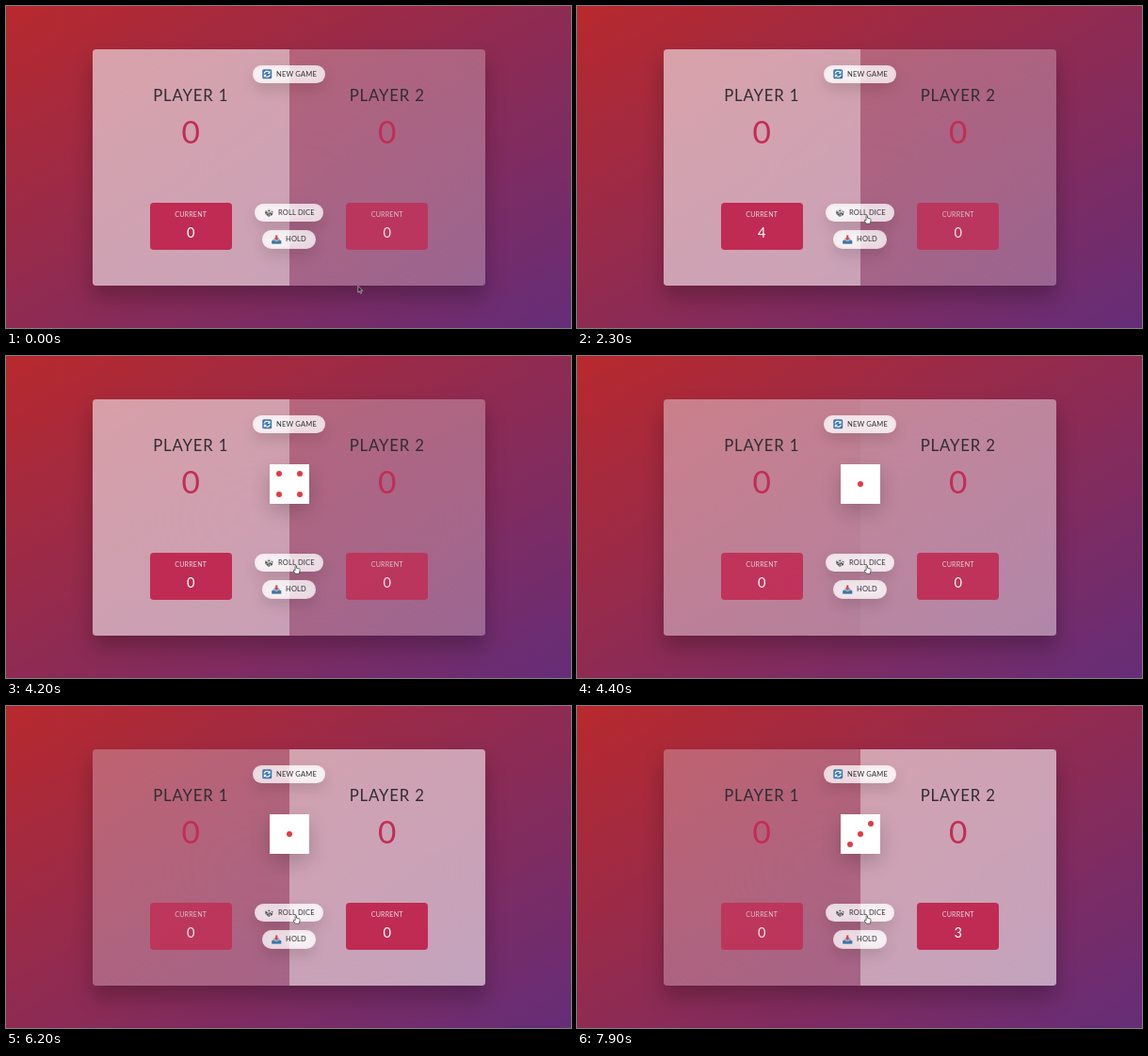
An HTML page that plays this animation: 600x342 px, repeating every 8 s.

```html
<!DOCTYPE html>
<html lang="en">
<head>
<meta charset="utf-8">
<title>Dice game</title>
<style>
  html, body { margin: 0; width: 100%; height: 100%; overflow: hidden; }
  body {
    position: relative;
    font-family: Lato, "Open Sans", sans-serif;
    color: #302d33;
    background: linear-gradient(to top left, #652d78 0%, #b8292d 100%);
  }
  main {
    position: absolute; left: 92px; top: 46px; width: 417px; height: 250.5px;
    border-radius: 3.75px; overflow: hidden;
    background: rgba(255, 255, 255, .27);
    backdrop-filter: blur(83px);
    box-shadow: 0 12.5px 21px rgba(0, 0, 0, .25);
  }
  .player { position: absolute; top: 0; width: 208.5px; height: 100%; text-align: center; }
  .player + .player { left: 208.5px; }
  .player > div { position: absolute; left: 0; width: 100%; }
  .name { top: 39px; font-size: 16.7px; line-height: 20px; letter-spacing: .85px; }
  .score { top: 67px; font-size: 33.4px; line-height: 40px; color: #c22d55; }
  .player > .current {
    left: 60.7px; top: 163px; width: 87px; height: 50px;
    border-radius: 3.75px; background: #c02b53; color: #fff;
  }
  .label { margin-top: 8px; font-size: 7.1px; line-height: 10px; letter-spacing: .2px; color: #ddd; }
  .value { margin-top: 4px; font-size: 14.6px; line-height: 19px; }
  .btn {
    position: absolute; height: 19.4px; border-radius: 10px;
    background: rgba(255, 255, 255, .7);
    backdrop-filter: blur(4px);
    box-shadow: 0 7.3px 14.6px rgba(0, 0, 0, .12);
    font-size: 7.5px; line-height: 20px; letter-spacing: .18px; white-space: nowrap;
  }
  .btn svg { position: absolute; left: 10px; top: 4.3px; width: 10.5px; height: 10.5px; }
  .btn span { position: absolute; left: 25px; top: 0; }
  .die {
    position: absolute; left: 187.5px; top: 69px; width: 42px; height: 42px;
    background: #fff; box-shadow: 0 8.3px 21px rgba(0, 0, 0, .2);
  }
  .die svg { display: block; fill: #e23a42; }
  .cursor { position: absolute; left: 0; top: 0; width: 12px; height: 12px; overflow: visible; }
  .cursor path { stroke-linejoin: round; }
</style>
</head>
<body>
<main>
  <section class="player">
    <div class="name">PLAYER 1</div>
    <div class="score">0</div>
    <div class="current"><div class="label">CURRENT</div><div class="value">0</div></div>
  </section>
  <section class="player">
    <div class="name">PLAYER 2</div>
    <div class="score">0</div>
    <div class="current"><div class="label">CURRENT</div><div class="value">0</div></div>
  </section>

  <div class="die"><svg width="42" height="42"></svg></div>

  <div class="btn" style="left:170px;top:16.8px;width:77px">
    <svg viewBox="0 0 20 20">
      <rect x=".5" y=".5" width="19" height="19" rx="3" fill="#3f78ad"/>
      <path d="M4 9a6 6 0 0 1 10-3M16 11a6 6 0 0 1-10 3" fill="none" stroke="#fff" stroke-width="2.2"/>
      <path d="M16.5 3v6h-6zM3.500 17v-6h6z" fill="#fff"/>
    </svg>
    <span>NEW GAME</span>
  </div>
  <div class="btn" style="left:172px;top:163.8px;width:73px">
    <svg viewBox="0 0 20 20">
      <path d="M2 6 11 2l7 5-8 4z" fill="#d9d9da"/>
      <path d="M2 6l8 5-1 8-7-6z" fill="#8d8c90"/>
      <path d="M10 11l8-4-1 8-8 4z" fill="#5d5c61"/>
      <g fill="#333"><circle cx="10" cy="6.500" r="1.500"/><circle cx="4.500" cy="10" r="1.200"/>
        <circle cx="7" cy="14.500" r="1.200"/></g>
      <g fill="#fff"><circle cx="12.300" cy="15" r="1.300"/><circle cx="15" cy="10.500" r="1.300"/></g>
    </svg>
    <span>ROLL DICE</span>
  </div>
  <div class="btn" style="left:180px;top:192.3px;width:57px">
    <svg viewBox="0 0 20 20">
      <path d="M4 8h12l3.500 5v5H.5v-5z" fill="#8fb2cf"/>
      <path d="M.5 12h6l1 2h5l1-2h6v6H.5z" fill="#3f72a0"/>
      <path d="M8 1h4v5h3l-5 5-5-5h3z" fill="#d8404b"/>
    </svg>
    <span>HOLD</span>
  </div>
</main>

<svg class="cursor">
  <path id="arrow" d="M0 0V7L1.600 5.500 2.700 8 3.900 7.500 2.800 5.100H5z" fill="#222" stroke="#e8dbe2" stroke-width=".6"/>
  <path id="hand" d="M-.7.600Q0-.5.700.600V3L3.500 3.700Q4.500 4 4.300 5.500L3.500 9H-.5L-2.700 5.800Q-2.700 4.500-.7 5.400z"
    fill="#fff" stroke="#333" stroke-width=".7"/>
</svg>

<script>
const LOOP = 8000, STEP = 100;
const SWITCH_AT = 4160, SWITCH_MS = 750;

// Step tables: [start ms, value]
const firstCurrent = [[0, 0], [2200, 4], [4200, 0]];
const secondCurrent = [[0, 0], [7600, 3]];
const dieFace = [[0, 0], [2400, 4], [4300, 1], [7700, 3]];
const cursorPath = [[0, 373.8, 297.3], [600, 373.8, 297.3], [1100, 324.7, 253.2], [1400, 307.8, 222.2]];
const HAND_AT = 1100;

const pips = {
  0: [],
  1: [[0, 0]],
  3: [[-1, 1], [0, 0], [1, -1]],
  4: [[-1, -1], [1, -1], [-1, 1], [1, 1]]
};

const $ = selector => document.querySelector(selector);
const players = [...document.querySelectorAll('.player')];
const clamp = x => Math.min(1, Math.max(0, x));
const mix = (a, b, k) => a + (b - a) * k;
const valueAt = (table, t) => table.filter(([start]) => start <= t).pop()[1];

// Same curve as the CSS "ease" keyword
function ease(x) {
  const bezier = (p, q, s) => 3 * p * s * (1 - s) ** 2 + 3 * q * s * s * (1 - s) + s ** 3;
  let low = 0, high = 1;
  for (let i = 0; i < 20; i++) {
    const mid = (low + high) / 2;
    if (bezier(.25, .25, mid) < x) low = mid; else high = mid;
  }
  return bezier(.1, 1, high);
}

function cursorAt(t) {
  const next = cursorPath.findIndex(([time]) => time > t);
  if (next < 0) return cursorPath[cursorPath.length - 1].slice(1);
  const [t0, x0, y0] = cursorPath[next - 1], [t1, x1, y1] = cursorPath[next];
  const k = (t - t0) / (t1 - t0);
  return [mix(x0, x1, k), mix(y0, y1, k)];
}

function showPlayer(player, active, current) {
  player.style.background = `rgba(255, 255, 255, ${.4 * active})`;
  player.querySelector('.current').style.opacity = mix(.8, 1, active);
  player.querySelector('.value').textContent = current;
}

function showDie(face) {
  const die = $('.die');
  die.style.display = face ? 'block' : 'none';
  die.firstChild.innerHTML = pips[face]
    .map(([x, y]) => `<circle cx="${21 + 11 * x}" cy="${21 + 11 * y}" r="3"/>`).join('');
}

function render(t) {
  const turn = ease(clamp((t - SWITCH_AT) / SWITCH_MS));
  showPlayer(players[0], 1 - turn, valueAt(firstCurrent, t));
  showPlayer(players[1], turn, valueAt(secondCurrent, t));
  showDie(valueAt(dieFace, t));
  const [x, y] = cursorAt(t);
  $('.cursor').style.transform = `translate(${x}px, ${y}px)`;
  $('#arrow').style.display = t < HAND_AT ? '' : 'none';
  $('#hand').style.display = t < HAND_AT ? 'none' : '';
}

const start = performance.now();
let shown = -1;
function tick() {
  const elapsed = (performance.now() - start) % LOOP;
  const t = Math.floor(elapsed / STEP) * STEP;
  if (t !== shown) render(shown = t);
  requestAnimationFrame(tick);
}
tick();
</script>
</body>
</html>
```
